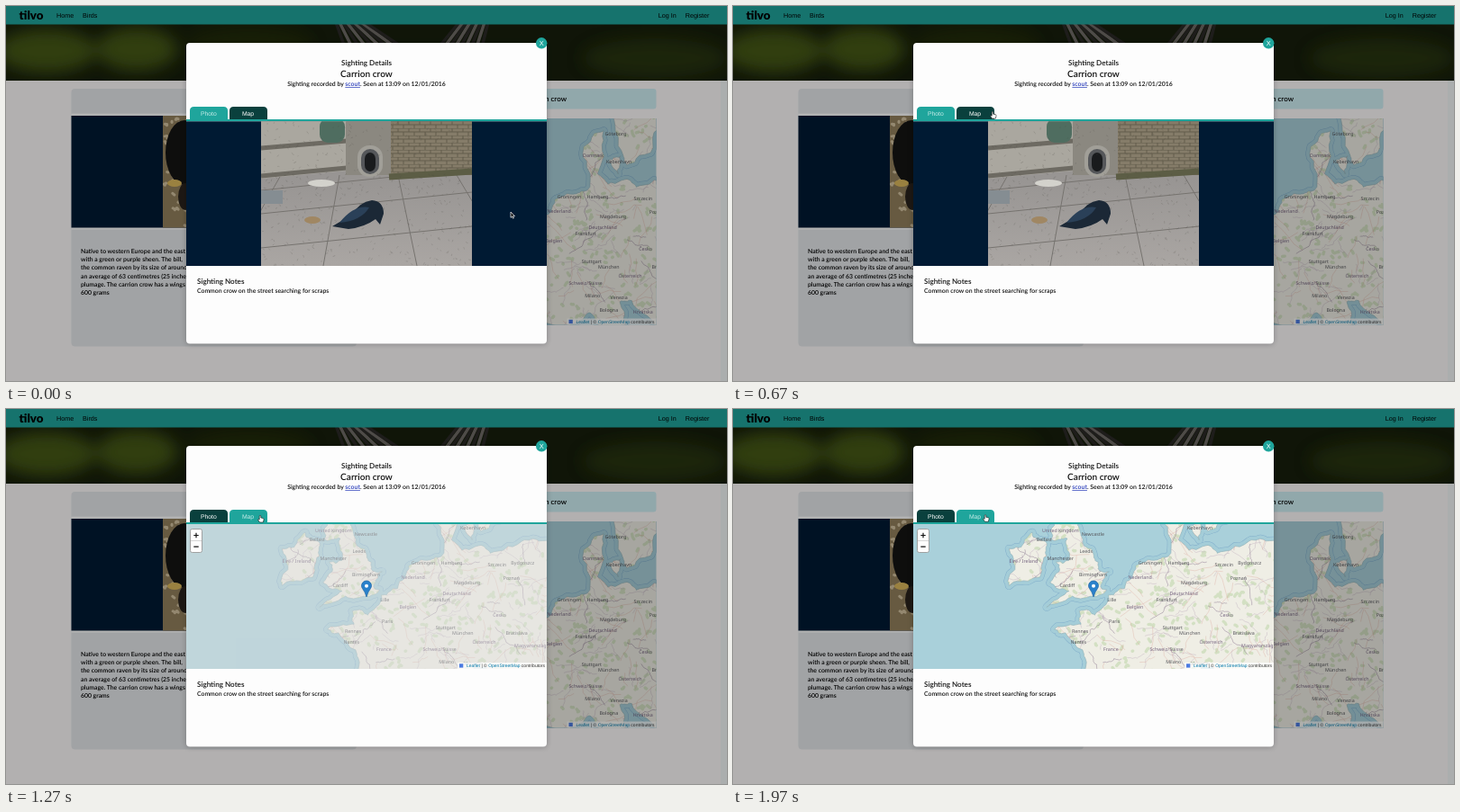
These frames come from a looping animation (800x417 px, 2000 ms). An HTML page:

```html
<!DOCTYPE html>
<html lang="en">
<head>
<meta charset="utf-8">
<title>Bird sighting</title>
<style>
html, body { margin: 0; height: 100%; overflow: hidden; background: #b2b0b1; }
#stage { display: block; width: 800px; height: 417px; text-rendering: geometricPrecision; }
text { font-family: Lato, "Open Sans", sans-serif; font-weight: 600; }
.ui { font-family: "Liberation Sans", Arial, sans-serif; font-weight: 400; }
.mid { text-anchor: middle; }
.end { text-anchor: end; }
.link { fill: #0078a8; }
.nav { font-size: 7.2px; }
#labels text { font: 5.3px "Noto Sans", sans-serif; fill: #55555a; text-anchor: middle; }
#labels .country { fill: #75647f; }
.tab { fill: #0a403d; }
.tabname { font-size: 6.8px; fill: #fff; }
#stage:not(.map) #photoTab, .map #mapTab { fill: #1fa59c; }
#stage:not(.map) #photoName, .map #mapName { fill: #c6ece8; }
#stage:not(.map) #mapPane, .map #photoPane { visibility: hidden; }
</style>
</head>
<body>
<svg id="stage" viewBox="0 0 800 417">
<defs>
  <filter id="soft" x="-50%" y="-50%" width="200%" height="200%"><feGaussianBlur stdDeviation="9"/></filter>
  <filter id="shade" x="-10%" y="-10%" width="120%" height="120%"><feGaussianBlur stdDeviation="3"/></filter>
  <linearGradient id="paving" x2="0" y2="1"><stop offset=".4" stop-color="#989593"/><stop offset="1" stop-color="#aaa6a3"/></linearGradient>
  <pattern id="brick" width="12" height="8" patternUnits="userSpaceOnUse">
    <rect width="12" height="8" fill="#857c69"/>
    <path d="M0 0H12M0 4H12M3 0V4M9 4V8" stroke="#625b4b"/>
  </pattern>
  <path id="tab" d="M204 126.5V116.5q0-4.5 4.5-4.5h33q4.5 0 4.5 4.5V126.5Z"/>
  <path id="coast"/>
  <clipPath id="onLand"><use href="#coast"/></clipPath>
  <g id="europe" fill="none" stroke-linejoin="round">
    <rect x="190" y="80" width="420" height="240" fill="#a9d0da"/>
    <use href="#coast" stroke="#82aecb" stroke-width="9"/>
    <use href="#coast" stroke="#a4cdd8" stroke-width="8"/>
    <use href="#coast" fill="#efeee5" stroke="#8caeb4" stroke-width=".6"/>
    <g clip-path="url(#onLand)">
      <path id="woods" stroke="#c2d8ad" stroke-width="3.4" stroke-linecap="round" opacity=".6"/>
      <path id="regions" stroke="#c3b4c0" stroke-width=".45"/>
      <path id="roads" stroke="#dba79b" stroke-width=".5" opacity=".7"/>
      <path id="borders" stroke="#8f7d93" stroke-width=".7" opacity=".7"/>
    </g>
    <g id="labels"></g>
  </g>
  <g id="credit">
    <rect x="-99" y="-7" width="99" height="7" fill="#fff" opacity=".75"/>
    <rect x="-97" y="-5.7" width="4.3" height="4.3" fill="#4c7be1"/>
    <text class="ui end" x="-2" y="-2" font-size="5" fill="#333"><tspan class="link">Leaflet</tspan> | © <tspan class="link">OpenStreetMap</tspan> contributors</text>
  </g>
</defs>

<!-- Page -->
<rect width="800" height="417" fill="#fffcfd"/>
<rect x="793" y="83" width="7" height="334" fill="#f5f9f9"/>
<svg y="20" width="800" height="63" viewBox="0 20 800 63">
  <rect y="20" width="800" height="63" fill="#171f0c"/>
  <g filter="url(#soft)" fill="#465a16">
    <ellipse cx="45" cy="50" rx="55" ry="24"/>
    <ellipse cx="145" cy="48" rx="45" ry="24"/>
    <ellipse cx="270" cy="45" rx="70" ry="22" opacity=".25"/>
    <ellipse cx="720" cy="58" rx="80" ry="22" opacity=".4"/>
  </g>
  <g id="wings" stroke-width="3.5"></g>
</svg>
<rect width="800" height="20.5" fill="#1fa59c"/>
<text x="14.5" y="14.6" font-size="13.3" style="font-weight:900">tilvo</text>
<text class="ui nav" x="56" y="12.6">Home</text>
<text class="ui nav" x="85" y="12.6">Birds</text>
<text class="ui nav" x="723.7" y="12.6">Log In</text>
<text class="ui nav" x="753.7" y="12.6">Register</text>

<rect x="72.5" y="92" width="316.500" height="286.500" rx="4" fill="#e6e9ec"/>
<rect x="72.500" y="119.500" width="316.500" height="129" fill="#fff"/>
<rect x="72.500" y="122" width="316.500" height="124.500" fill="#001a33"/>
<svg x="174" y="122" width="30" height="124.500" viewBox="174 122 30 124.500">
  <rect x="174" y="122" width="30" height="125" fill="#94805d"/>
  <path id="gravel" stroke="#d3c3a0" stroke-width="3" stroke-linecap="round"/>
  <ellipse cx="198" cy="163" rx="21" ry="36" fill="#141413"/>
  <ellipse cx="199" cy="212" rx="8" ry="15" fill="#29231c"/>
  <ellipse cx="187" cy="197" rx="8" ry="4" fill="#dcb85c"/>
</svg>
<g id="about" font-size="6.85"></g>
<rect x="410" y="92" width="311.500" height="22.500" rx="3" fill="#cff0f5"/>
<text class="end" x="622" y="105.800" font-size="8">Carrion crow</text>
<svg x="410" y="125" width="311.500" height="229.500" viewBox="248 84 311.500 229.500"><use href="#europe"/></svg>
<use href="#credit" x="721.500" y="354.500"/>
<rect width="800" height="417" opacity=".3"/>

<!-- Dialog -->
<rect x="200" y="42" width="400" height="334" rx="4" opacity=".25" filter="url(#shade)"/>
<rect x="200" y="41" width="400" height="334.500" rx="4" fill="#fdfdfd"/>
<circle cx="594.200" cy="41.300" r="6.200" fill="#1fa59c"/>
<text class="ui mid" x="594.200" y="44" font-size="7.500" fill="#fff">X</text>
<g class="mid" fill="#111">
  <text x="400" y="65.800" font-size="8.100">Sighting Details</text>
  <text x="400" y="79" font-size="10.100">Carrion crow</text>
  <text x="400" y="89" font-size="6.900">Sighting recorded by <tspan fill="#2438b8" text-decoration="underline">scout</tspan>. Seen at 13:09 on 12/01/2016</text>
</g>
<use id="photoTab" class="tab" href="#tab"/>
<use id="mapTab" class="tab" href="#tab" x="44"/>
<text id="photoName" class="ui mid tabname" x="224.800" y="121.500">Photo</text>
<text id="mapName" class="ui mid tabname" x="268.500" y="121.500">Map</text>
<rect x="200" y="126" width="400" height="2.300" fill="#1fa59c"/>

<g id="photoPane">
  <rect x="200" y="128.300" width="400" height="160.700" fill="#001a33"/>
  <svg x="283" y="128.300" width="234" height="160.700" viewBox="283 128.300 234 160.700">
    <rect x="283" y="128" width="234" height="161" fill="url(#paving)"/>
    <path id="joints" stroke="#76736f" fill="none"/>
    <path d="M283 128H378V183L283 192Z" fill="#aaa79f"/>
    <path d="M283 158L378 150M283 189L378 180" stroke="#6d6a62" stroke-width="5"/>
    <rect x="348" y="125" width="28" height="27" rx="9" fill="#4f6d60"/>
    <rect x="377" y="128" width="50" height="60" fill="#8b8880"/>
    <rect x="427" y="128" width="90" height="60" fill="url(#brick)"/>
    <path d="M425 190L517 184" stroke="#5c5d45" stroke-width="7"/>
    <g id="arch"></g>
    <path id="grain" stroke="#4d4a44" stroke-linecap="round" opacity=".2"/>
    <rect x="283" y="205" width="24" height="15" fill="#858d92"/>
    <ellipse cx="350" cy="197" rx="15" ry="4" fill="#d3d2cc"/>
    <ellipse cx="340" cy="238" rx="9" ry="4" fill="#a08763"/>
    <path d="M362 245L384 232Q392 218 406 216Q419 217 419 231L415 243L410 237Q398 246 380 248Z" fill="#1b2836"/>
    <path d="M370 241Q386 221 403 224Q394 239 370 241Z" fill="#2a4058"/>
  </svg>
</g>

<g id="mapPane">
  <rect x="200" y="128.300" width="400" height="160.700" fill="#ddd"/>
  <svg x="200" y="128.300" width="400" height="160.700" viewBox="200 128.300 400 160.700"><use id="tiles" href="#europe"/></svg>
  <path d="M400 209Q398.500 203.500 395.600 199.800A5.500 5.500 0 1 1 404.400 199.800Q401.500 203.500 400 209Z" fill="#2a81cb" stroke="#2268a5" stroke-width=".7"/>
  <circle cx="400" cy="196.700" r="2" fill="#fff"/>
  <rect x="204.500" y="133.500" width="13" height="26" rx="2" fill="#fff" stroke="#999" stroke-width=".9"/>
  <path d="M205 146.500h12" stroke="#bbb" stroke-width=".6"/>
  <path d="M208.300 140.500h5.400M211 137.800v5.400M208.300 153.200h5.400" stroke="#111" stroke-width="1.200"/>
  <use href="#credit" x="600" y="289"/>
</g>

<text x="212" y="309.300" font-size="8.100" fill="#111">Sighting Notes</text>
<text x="212" y="319.100" font-size="6.870" fill="#111">Common crow on the street searching for scraps</text>

<g id="cursor">
  <path id="arrow" d="M0 0V6.300L1.500 5L2.500 7.200L3.500 6.700L2.500 4.600H4.500Z" fill="#111" stroke="#fff" stroke-width=".7"/>
  <path id="hand" d="M-.8 .8Q0-.5 .8 .8V3L3.300 3.500Q4.300 3.800 4 5.200L3.300 8H-.5L-2.600 5Q-2.200 4-.8 5Z" fill="#fff" stroke="#111" stroke-width=".6"/>
</g>
</svg>

<script>
const $ = id => document.getElementById(id);
const draw = (id, d) => $(id).setAttribute('d', d);
const times = (n, f) => Array.from({length: n}, (_, i) => f(i)).join('');
let seed = 11;
const rnd = () => (seed = seed * 16807 % 2147483647) / 2147483647;

// Splits a segment at random midpoints so that it looks natural
function rough(a, b, depth) {
  if (!depth) return [b];
  const d = Math.min(6, Math.hypot(b[0] - a[0], b[1] - a[1]) * .4);
  const m = a.map((v, i) => (v + b[i]) / 2 + (rnd() - .5) * d);
  return [...rough(a, m, depth - 1), ...rough(m, b, depth - 1)];
}
function trace(points, depth) {
  const rest = points.slice(1).flatMap((p, i) => rough(points[i], p, depth));
  return 'M' + [points[0], ...rest].map(p => p.map(v => v.toFixed(1))).join('L');
}
// Random strokes that start within a box
const scatter = (count, reach, depth, [x, y, w, h]) => times(count, () => {
  const a = [x + rnd() * w, y + rnd() * h];
  return trace([a, a.map(v => v + (rnd() - .5) * reach)], depth);
});

// Web Mercator, in stage pixels: "lon,lat" to [x, y]
const merc = lat => Math.log(Math.tan(Math.PI / 4 + lat * Math.PI / 360));
function project(place) {
  const [lon, lat] = place.split(',').map(Number);
  return [401.3 + 9.5 * lon, 208 - 544 * (merc(lat) - 1.0335)];
}
const shores = [
  '-5,56.5 -2,55.9 -1.5,55 -.1,53.6 .4,52.8 1.7,52.6 .7,51.5 1.4,51.3 .2,50.8 -3,50.7 -5.6,50 -3,51.2 -5.2,51.8 -4.1,52.8 -4.5,53.3 -3,53.4 -3.2,54.9 -5,54.8',
  '-6,53.4 -6.4,52.2 -10,51.6 -9.3,53 -10,54.2 -8.6,54.3 -7.3,55.3 -5.6,54.6',
  '-1.3,43 -1.1,46 -2.5,47.4 -4.7,48.3 -1.6,48.7 -1.8,49.7 0,49.4 1.6,50.9 3.5,51.4 4.8,53 7,53.4 8.9,53.9 8.2,56.6 10.5,57.6 9.8,54.8 11,54.1 13.7,54.3 14.3,53.9 18.3,54.8 22,54.7 22,43 17,43 13.8,45.3 12.4,45.2 13.8,42.5 10.4,42.5 8.9,44.3 6.5,43.2',
  '11.1,55.7 12.5,56 12.2,54.8',
  '11.2,59 12.8,56 13.2,55.4 16,56.2 17,59'];
draw('coast', shores.map(shore => {
  const points = shore.split(' ').map(project);
  return trace([...points, points[0]], 3) + 'Z';
}).join(''));

const mapBox = [295, 82, 310, 234];
draw('woods', scatter(520, 7, 1, mapBox));
draw('regions', scatter(190, 52, 3, mapBox));
draw('roads', scatter(110, 75, 2, mapBox));
draw('borders', scatter(30, 80, 4, mapBox));

const cities = 'Belfast -5.9,54.7|Newcastle -.2,55.1|Leeds -1,53.9|Manchester -4,53.4|Birmingham -.2,52.3|Cardiff -3.2,51.5|Rennes -1.7,48|Nantes -1.9,47.2|Paris 2.3,48.8|Lille 2,50.4|Groningen 6.5,53.1|Hamburg 9.8,53.1|Magdeburg 11.6,51.7|Frankfurt 8.4,50.4|Stuttgart 9.1,48.3|München 11.1,47.9|Szczecin 15.1,53|Bydgoszcz 18.1,53.1|Poznań 16.8,52|Bratislava 17.4,47.9|Göteborg 11.9,57.3|København 12.3,55.5|Milano 9.2,45.6|Venezia 12.3,45.4|Bologna 11.1,44.4';
const countries = 'United Kingdom -4,55.3|Éire / Ireland -8.3,53.2|Danmark 9.3,55.9|Nederland 5.3,52.1|Belgien 4.7,49.9|Deutschland 10.4,50.9|France 1.9,46.6|Česko 15.4,49.3|Österreich 13.6,47.2|Schweiz/Suisse 8.4,46.6|Magyarország 19,46.9|Hrvatska 15.1,44.2';
const label = kind => entry => {
  const [, name, place] = entry.match(/(.*) (.*)/), [x, y] = project(place);
  return `<text class="${kind}" x="${x}" y="${y}">${name}</text>`;
};
$('labels').innerHTML = cities.split('|').map(label('city')).join('') + countries.split('|').map(label('country')).join('');

// Photographs
draw('gravel', scatter(45, 5, 1, [174, 122, 30, 125]));
draw('grain', scatter(420, 4, 1, [283, 128, 234, 161]));
draw('joints', times(3, i => `M283 ${205 + 20 * i + 6 * i * i}l234-24`)
  + times(4, i => `M${305 + 65 * i} 188L${248 + 104 * i} 289`));
$('arch').innerHTML = ['#a19f98', '#55575a', '#191b1d'].map((fill, i) =>
  `<rect x="${390 + 4 * i}" y="${155 + 4 * i}" width="${28 - 8 * i}" height="${35 - 7 * i}" rx="${13 - 3 * i}" fill="${fill}"/>`).join('');
$('wings').innerHTML = times(9, i => {
  const tone = i % 2 ? '#6f6b67' : '#2b2927';
  return `<path stroke="${tone}" d="M${366 + 4 * i} 18L${376 + 8 * i} 46M${535 - 4 * i} 18L${528 - 6 * i} 46"/>`;
});

const about = ['Native to western Europe and the east', 'with a green or purple sheen. The bill,', 'the common raven by its size of around',
  'an average of 63 centimetres (25 inche', 'plumage. The carrion crow has a wings', '600 grams'];
$('about').innerHTML = about.map((line, i) => `<text x="83" y="${275 + i * 9.2}">${line}</text>`).join('');

const clamp = x => Math.min(1, Math.max(0, x));
const ramp = (t, a, b) => {
  const x = clamp((t - a) / (b - a));
  return x * x * (3 - 2 * x);
};
const start = performance.now();
function frame() {
  const t = (performance.now() - start) % 2000;
  const reach = ramp(t, 0, 570), settle = ramp(t, 600, 900), drift = ramp(t, 1500, 1970);
  const x = 560 - 271 * reach - 7 * settle - 2 * drift;
  const y = 229 - 112 * reach ** 1.3 + settle - .7 * drift;
  const over = t > 545;
  $('cursor').setAttribute('transform', `translate(${x} ${y})`);
  $('arrow').style.display = over ? 'none' : '';
  $('hand').style.display = over ? '' : 'none';
  $('stage').classList.toggle('map', t >= 1160);
  $('tiles').style.opacity = clamp((t - 1160) / 200);
  requestAnimationFrame(frame);
}
frame();
</script>
</body>
</html>
```
